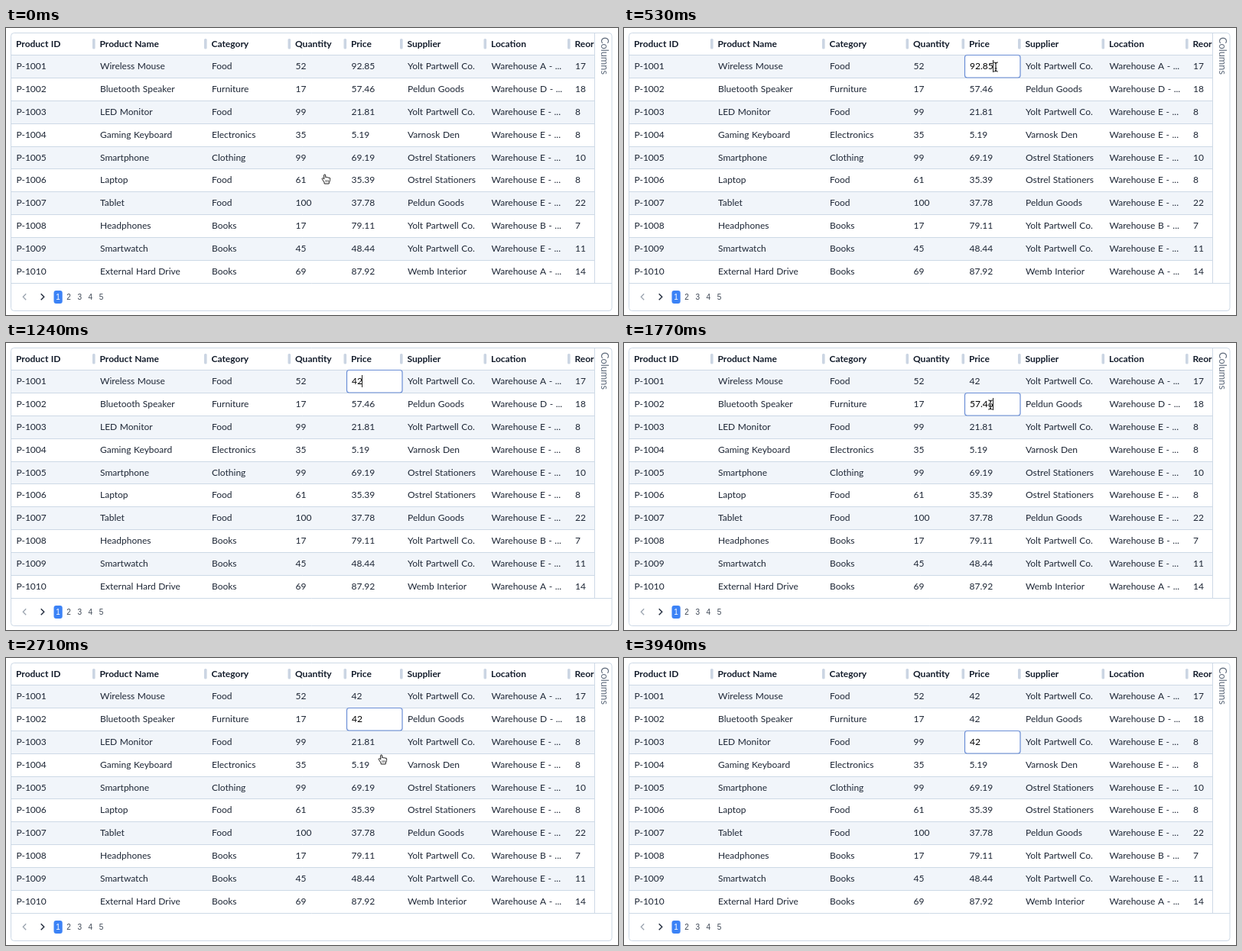
An HTML page with a canvas for the animation above (4080 ms loop, 800x376 px).

```html
<!DOCTYPE html>
<html lang="en">
<head>
<meta charset="utf-8">
<title>Editable product grid</title>
<style>
  html, body { margin: 0; width: 100%; height: 100%; overflow: hidden; background: #fff; }
  canvas { display: block; width: 800px; height: 376px; }
</style>
</head>
<body>
<canvas id="stage"></canvas>
<script>
const LOOP = 4080, W = 800, H = 376;
const canvas = document.getElementById('stage');
const ctx = canvas.getContext('2d');
const dpr = window.devicePixelRatio || 1;
canvas.width = W * dpr;
canvas.height = H * dpr;

const FAMILY = 'Lato, "Open Sans", sans-serif';
const FONT = '12px ' + FAMILY;
const LINE = '#cdd9e6', INK = '#1e2736', HEAD = '#131c2b';
const LEFT = 6.5, RIGHT = 792, GRID_RIGHT = 769;

const columns = [
  ['Product ID', 13], ['Product Name', 122.5], ['Category', 268.5], ['Quantity', 378],
  ['Price', 451], ['Supplier', 524.5], ['Location', 634], ['Reorder', 743.5]
];
const PRICE = 4;

const rows = [
  'Wireless Mouse|Food|52|92.85|Yolt Partwell Co.|A|17',
  'Bluetooth Speaker|Furniture|17|57.46|Peldun Goods|D|18',
  'LED Monitor|Food|99|21.81|Yolt Partwell Co.|E|8',
  'Gaming Keyboard|Electronics|35|5.19|Varnosk Den|E|8',
  'Smartphone|Clothing|99|69.19|Ostrel Stationers|E|10',
  'Laptop|Food|61|35.39|Ostrel Stationers|E|8',
  'Tablet|Food|100|37.78|Peldun Goods|E|22',
  'Headphones|Books|17|79.11|Yolt Partwell Co.|B|7',
  'Smartwatch|Books|45|48.44|Yolt Partwell Co.|E|11',
  'External Hard Drive|Books|69|87.92|Wemb Interior|A|14'
].map((line, i) => {
  const cells = line.split('|');
  cells[5] = `Warehouse ${cells[5]} - ...`;
  return [`P-${1001 + i}`, ...cells];
});

// Each edit: open with caret, select all, type two digits, commit.
const edits = [
  { open: 530, select: 610, type: 1160, second: 1220, blink: 1440, commit: 1640 },
  { open: 1770, select: 1850, type: 2390, second: 2470, blink: 2670, commit: 2910 },
  { open: 3090, select: 3170, type: 3560, second: 3650, blink: 3930, commit: LOOP }
];

// Pointer hot spot: time, x, y
const path = [
  [40, 417, 192], [450, 486, 51], [1280, 486, 51], [1600, 479, 81],
  [2540, 479, 81], [2710, 491, 127], [2870, 492, 119]
];
const hidden = [[1160, 1280], [2390, 2540], [3560, LOOP]];

const rowY = i => Math.round(34.82 + i * 29.93);
const baseline = i => rowY(i) + 19;

function text(str, x, y, color = INK, font = FONT) {
  ctx.font = font;
  ctx.fillStyle = color;
  ctx.fillText(str, x, y);
}

function rect(x, y, w, h, color, radius = 0) {
  ctx.fillStyle = color;
  ctx.beginPath();
  ctx.roundRect(x, y, w, h, radius);
  ctx.fill();
}

function stroke(points, color, width = 1) {
  ctx.strokeStyle = color;
  ctx.lineWidth = width;
  ctx.beginPath();
  points.forEach(([x, y]) => ctx.lineTo(x, y));
  ctx.stroke();
}

function drawGrid(t) {
  ctx.save();
  ctx.beginPath();
  ctx.rect(LEFT, 7, GRID_RIGHT - LEFT, 328);
  ctx.clip();
  rows.forEach((cells, i) => {
    if (i % 2 === 0) rect(LEFT, rowY(i), GRID_RIGHT - LEFT, rowY(i + 1) - rowY(i), '#f1f5fa');
    cells.forEach((cell, c) => {
      const edit = edits[i];
      if (c === PRICE && edit) {
        if (t >= edit.open && t < edit.commit) return;
        if (t >= edit.commit) cell = '42';
      }
      text(cell, columns[c][1] + .5, baseline(i));
    });
  });
  columns.forEach(([label, x], i) => {
    text(label, x, 25, HEAD, 'bold ' + FONT);
    if (i) rect(x - 9.5, 14, 3.6, 13.5, '#cbd5e3', 1.5);
  });
  for (let i = 0; i < 10; i++) {
    const y = rowY(i) + .5;
    stroke([[LEFT, y], [GRID_RIGHT, y]], LINE);
  }
  ctx.restore();

  stroke([[GRID_RIGHT + .5, 7], [GRID_RIGHT + .5, 334]], LINE);
  stroke([[LEFT, 334.5], [RIGHT, 334.5]], LINE);
  ctx.beginPath();
  ctx.roundRect(LEFT, 6.5, RIGHT - LEFT, 364, 4);
  ctx.stroke();

  ctx.save();
  ctx.translate(777.5, 12);
  ctx.rotate(Math.PI / 2);
  text('Columns', 0, 0, '#5f6b7c', '12.8px ' + FAMILY);
  ctx.restore();
}

function drawPager() {
  stroke([[26.2, 348.3], [22.3, 352.3], [26.2, 356.3]], '#9aa3af', 1.3);
  stroke([[45.7, 348.3], [49.7, 352.3], [45.7, 356.3]], '#273142', 1.5);
  rect(62.5, 344, 11.2, 17, '#3b82f6', 3);
  ctx.textAlign = 'center';
  for (let n = 1; n <= 5; n++) {
    text(n, 53.8 + n * 14.15, 356, n === 1 ? '#fff' : '#3c4654',
      '10px "Liberation Sans", Arial, sans-serif');
  }
  ctx.textAlign = 'left';
}

function drawEditor(t) {
  const row = edits.findIndex(e => t >= e.open && t < e.commit);
  if (row < 0) return;
  const e = edits[row], y = rowY(row), x = 452;
  rect(445.5, y + .5, 72.5, 29.5, '#fff', 3);
  ctx.strokeStyle = '#6b8ed6';
  ctx.lineWidth = 1.2;
  ctx.stroke();

  const value = t < e.type ? rows[row][PRICE] : t < e.second ? '4' : '42';
  ctx.font = FONT;
  const width = ctx.measureText(value).width;
  const selected = t >= e.select && t < e.type;
  if (selected) rect(x, y + 7, width, 16, '#add2fa');
  text(value, x, baseline(row), '#000');
  if (!selected && t < e.blink) rect(Math.floor(x + width), y + 7, 1, 16, '#222');
}

function pointerAt(t) {
  let i = 0;
  while (i < path.length - 2 && t > path[i + 1][0]) i++;
  const [t0, x0, y0] = path[i], [t1, x1, y1] = path[i + 1];
  const u = Math.min(1, Math.max(0, (t - t0) / (t1 - t0)));
  const k = u * u * (3 - 2 * u);
  return [x0 + (x1 - x0) * k, y0 + (y1 - y0) * k];
}

const hand = new Path2D(
  'M -1.4 1 L -1.2 6 L -2.4 4.9 C -3.6 4.2 -4.3 5.3 -3.6 6.2 L -1 10.2 L -.8 12 ' +
  'L 5.2 12 L 5.4 10.2 C 6.6 8.6 6.7 6.8 6.6 5 C 6.4 3.7 5 3.7 4.7 4.6 ' +
  'C 4.5 3.2 2.9 3.2 2.7 4.2 C 2.4 3 1 3 .9 3.9 L .7 1 C .6 -.5 -1.3 -.5 -1.4 1 Z');

function drawHand() {
  ctx.lineJoin = 'round';
  ctx.fillStyle = '#fff';
  ctx.fill(hand);
  ctx.strokeStyle = '#1b1b1b';
  ctx.lineWidth = 1;
  ctx.stroke(hand);
  [.8, 2.6, 4.4].forEach(x => stroke([[x, 7], [x, 10]], '#333', .7));
  ctx.lineJoin = 'miter';
}

function drawBeam() {
  [['#fff', 2.4], ['#111', 1.1]].forEach(([color, width]) => {
    stroke([[0, -5], [0, 5]], color, width);
    [-1, 1].forEach(s => stroke([[-2.8, s * 6], [-1, s * 5.7], [0, s * 4.8], [1, s * 5.7], [2.8, s * 6]], color, width));
  });
  stroke([[-1.5, 2], [1.5, 2]], '#111', 1);
}

function drawPointer(t) {
  if (hidden.some(([a, b]) => t >= a && t < b)) return;
  const [x, y] = pointerAt(t);
  const overEditor = edits.some((e, i) =>
    t >= e.open && t < e.commit && y >= rowY(i) && y < rowY(i + 1));
  ctx.save();
  ctx.translate(x, y);
  overEditor ? drawBeam() : drawHand();
  ctx.restore();
}

function draw(t) {
  ctx.setTransform(dpr, 0, 0, dpr, 0, 0);
  ctx.wordSpacing = '0.5px';
  rect(0, 0, W, H, '#fff');
  drawGrid(t);
  drawPager();
  drawEditor(t);
  drawPointer(t);
}

const start = performance.now();
function frame() {
  draw((performance.now() - start) % LOOP);
  requestAnimationFrame(frame);
}
frame();
</script>
</body>
</html>
```
